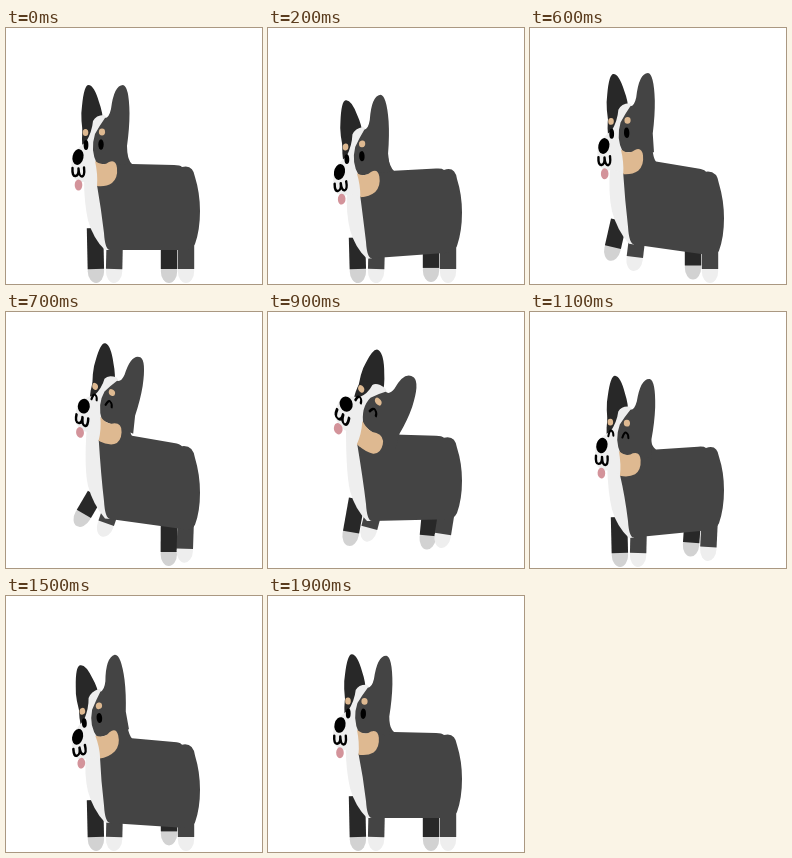
Animation of 256 by 256 pixels, one loop 2 s. Source, as an HTML page with a canvas:

```html
<!DOCTYPE html>
<html lang="en">
<head>
<meta charset="utf-8">
<title>Jumping dog</title>
<style>
  html, body { margin: 0; width: 100%; height: 100%; overflow: hidden; background: #fff; }
  canvas { display: block; width: 100vmin; height: 100vmin; }
</style>
</head>
<body>
<canvas id="stage" width="256" height="256"></canvas>
<script>
const ctx = document.getElementById('stage').getContext('2d');
const LOOP = 2000, STEP = 100;
const COAT = '#444444', SHADE = '#282828', FUR = '#eeeeee', FUR_SHADE = '#d2d2d2';
const TAN = '#deb991', PINK = '#d3939a', BLACK = '#000';

const lerp = (a, b, k) => a + (b - a) * k;

function smooth(from, to, t) {
  const k = Math.min(1, Math.max(0, (t - from) / (to - from)));
  return k * k * (3 - 2 * k);
}

// Eased bump: 0 at start, 1 at peak, 0 again at end.
const pulse = (start, peak, end, t) => smooth(start, peak, t) - smooth(peak, end, t);

// The whole jump: crouch, leap, land in a second crouch.
const squat = t => pulse(0, 400, 600, t) + pulse(1030, 1300, 1650, t);
const lift = t => pulse(510, 800, 1120, t);

// Head tilt trails the jump and sways once at the end.
function headMatrix(t) {
  const late = t - 50;
  const tilt = 0.85 * lift(late) - 0.5 * squat(late) + 0.1 * pulse(1600, 1800, 2000, t);
  return {
    a: 1 + 0.03 * Math.abs(tilt), b: tilt,
    c: -0.38 * tilt, d: 1 - 0.17 * Math.abs(tilt),
    x: 72 + 8 * lift(t) - squat(t),
    y: 129 + 30 * squat(t) - 48 * lift(t)
  };
}

function headMap(m) {
  return (x, y) => [
    m.x + m.a * (x - 72) + m.c * (y - 129),
    m.y + m.b * (x - 72) + m.d * (y - 129)
  ];
}

// The chest leads the movement and the rump follows it.
function bodyMap(t) {
  const front = t + 20, rear = t - 100;
  const topF = 136 + 15 * squat(front) - 20 * lift(front);
  const lowF = 222 + 15 * squat(front) - 19 * lift(front);
  const topR = 136 + 13 * squat(rear) - 13 * lift(rear);
  const lowR = 222 + 13 * squat(rear) - 15 * lift(rear);
  return (x, y) => {
    const u = (x - 100) / 88;
    return [x, lerp(lerp(topF, topR, u), lerp(lowF, lowR, u), (y - 136) / 86)];
  };
}

// Each step is one point (line) or two points (quadratic curve).
function shape(color, start, steps) {
  ctx.beginPath();
  ctx.moveTo(...start);
  for (const s of steps) {
    if (s.length === 2) ctx.quadraticCurveTo(...s[0], ...s[1]);
    else ctx.lineTo(...s[0]);
  }
  ctx.closePath();
  ctx.fillStyle = color;
  ctx.fill();
}

function fillPath(color, d) {
  ctx.fillStyle = color;
  ctx.fill(new Path2D(d));
}

function strokePath(d, width) {
  ctx.strokeStyle = BLACK;
  ctx.lineWidth = width;
  ctx.lineCap = ctx.lineJoin = 'round';
  ctx.stroke(new Path2D(d));
}

function oval(color, x, y, rx, ry, turn = 0) {
  ctx.beginPath();
  ctx.ellipse(x, y, rx, ry, turn, 0, Math.PI * 2);
  ctx.fillStyle = color;
  ctx.fill();
}

// A straight leg from hip to paw; far legs are shaded.
function leg([hx, hy], px, py, far) {
  const len = Math.hypot(px - hx, py - hy);
  ctx.save();
  ctx.translate(hx, hy);
  ctx.rotate(Math.atan2(hx - px, py - hy));
  oval(far ? FUR_SHADE : FUR, 0, len - 4, 8.2, 12);
  ctx.fillStyle = far ? SHADE : COAT;
  ctx.fillRect(-8.2, 0, 16.4, len - 6);
  ctx.restore();
}

function legs(t, body, far) {
  const hind = t - (far ? 150 : 100), fore = t + (far ? 60 : 20);
  const up = lift(hind), reach = lift(fore);
  leg(body(far ? 163 : 180, 205),
    far ? 163 - 4 * up : 180 - 6 * up,
    247 - 19 * up - (far ? 7 * squat(t - 100) : 0), far);
  leg(body(far ? 89 : 109, 200),
    far ? 90 - 16 * reach : 108 - 12 * reach,
    247 - (far ? 42 : 37) * reach, far);
}

function withHead(m, draw) {
  ctx.save();
  ctx.transform(m.a, m.b, m.c, m.d, m.x, m.y);
  ctx.translate(-72, -129);
  draw();
  ctx.restore();
}

function farEar() {
  fillPath(SHADE, 'M78 112Q74 90 76 78Q78 57 82.5 57Q88 57 93 74Q97 85 97 95L88 112Z');
}

function face(happy) {
  fillPath(SHADE, 'M77 99Q82 92 91 90L90 102Q84 118 77 124Q75 110 77 99Z');
  fillPath(FUR, 'M98 87Q90 87 87 93Q86 104 80 114Q70 120 66 130Q64 146 68 150' +
    'Q74 156 80 153L94 158L100 145L94 134L94 108L103 92Z');
  fillPath(COAT, 'M99 90Q103 90 105 81Q108 57 117 57Q123 58 123.5 85Q123.5 100 121 118' +
    'L122 137L91 136Q84 122 89 106Q94 97 99 90Z');
  fillPath(TAN, 'M89 133Q97 139 103 134Q110 131 111 140Q112 150 106 155Q100 159 91 158Q92 146 89 133Z');
  oval(TAN, 96, 104, 3.1, 3.4);
  oval(TAN, 79.5, 104.5, 2.8, 3.5);
  if (happy) {
    strokePath('M92 119Q94 112 96 114Q98 115 98 119', 2);
    strokePath('M78 119Q79 112 81 113Q83 114 83 118', 2);
  } else {
    oval(BLACK, 95, 116.5, 2.7, 5.2);
    oval(BLACK, 80, 117, 2.4, 5);
  }
  oval(PINK, 72.5, 157, 3.8, 5.5);
  strokePath('M66.5 140Q66 148.5 69.5 148Q73 147.5 72.5 140.5Q73 148.5 76 148.5Q79 148 78 139.5', 2.4);
  oval(BLACK, 72, 129, 5.5, 8, 0.2);
}

function torso(head, body) {
  shape(FUR, head(82, 135), [
    [head(78, 150)],
    [body(78, 175), body(82, 192)],
    [body(87, 210), body(99, 222)],
    [body(104, 222)],
    [body(104, 160)],
    [head(100, 145)]
  ]);
  shape(COAT, head(98, 140), [
    [head(120, 118)],
    [body(122, 133), body(126, 136)],
    [body(168, 137)],
    [body(174, 137), body(176, 139)],
    [body(187, 136), body(189, 149)],
    [body(194, 165), body(194, 183)],
    [body(194, 202), body(189, 216)],
    [body(186, 222), body(180, 222)],
    [body(104, 222)],
    [body(99, 222), body(98, 205)],
    [body(95, 180), head(91, 157)]
  ]);
}

function draw(t) {
  const m = headMatrix(t);
  const body = bodyMap(t);
  ctx.fillStyle = '#fff';
  ctx.fillRect(0, 0, 256, 256);
  legs(t, body, true);
  withHead(m, farEar);
  legs(t, body, false);
  torso(headMap(m), body);
  withHead(m, () => face(t >= 700 && t <= 1200));
}

const begin = performance.now();

function tick() {
  const t = (performance.now() - begin) % LOOP;
  draw(Math.floor(t / STEP) * STEP);
  requestAnimationFrame(tick);
}
tick();
</script>
</body>
</html>
```
